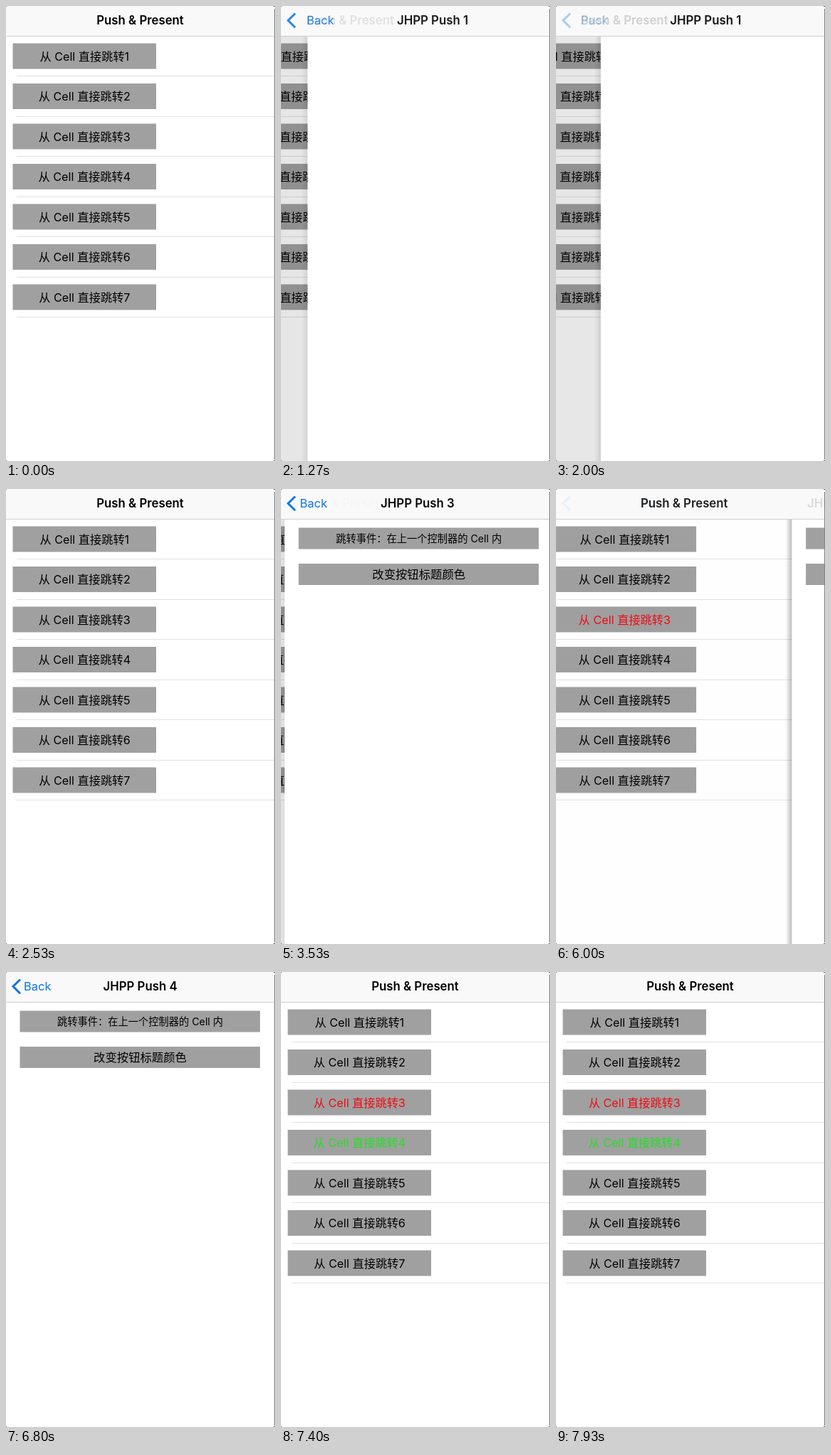
These frames come from a looping animation (378 by 640 pixels, 8 s). An HTML page with a canvas:

```html
<!DOCTYPE html>
<html lang="zh">
<head>
<meta charset="utf-8">
<title>Push &amp; Present</title>
<style>
html, body { margin: 0; width: 100%; height: 100%; overflow: hidden; background: #fff; }
canvas { display: block; width: 378px; height: 640px; }
</style>
</head>
<body>
<canvas id="stage"></canvas>
<script>
const W = 378, H = 640, BAR = 42, LOOP = 8000, TICK = 200 / 3;
const FONT = 'Inter, "Noto Sans CJK SC", "Noto Sans CJK", sans-serif';
const GREY = '#a0a0a0', BLUE = '#0b74e8';
const MID = 188.5;

// Each visit: push start, Back pressed, pop start, colour given to its cell
const visits = [
  { page: 1, push: 1053, press: 1925, pop: 1960, color: '#000' },
  { page: 3, push: 3190, press: 4925, pop: 5000, color: '#f00a14' },
  { page: 4, push: 5967, press: 6860, pop: 6900, color: '#22e022' }
];

const canvas = document.getElementById('stage');
const ctx = canvas.getContext('2d');
const dpr = window.devicePixelRatio || 1;
canvas.width = W * dpr;
canvas.height = H * dpr;

// Critically damped spring, 0 to 1
function spring(ms) {
  if (ms <= 0) return 0;
  if (ms >= 500) return 1;
  const x = ms * 0.01826;
  return 1 - (1 + x) * Math.exp(-x);
}

const smooth = p => p * p * (3 - 2 * p);

function rect(x, y, w, h, color) {
  ctx.fillStyle = color;
  ctx.fillRect(x, y, w, h);
}

function text(str, x, y, size, color, align = 'center', weight = 400) {
  ctx.font = `${weight} ${size}px ${FONT}`;
  ctx.textAlign = align;
  ctx.fillStyle = color;
  ctx.fillText(str, x, y);
}

function drawList(x, t) {
  ctx.save();
  ctx.translate(x, 0);
  for (let i = 0; i < 7; i++) {
    const y = 52.5 + i * 56.5;
    const visit = visits.find(v => v.page === i + 1);
    const color = visit && t >= visit.press ? visit.color : '#000';
    rect(9.5, y, 201.5, 36, GREY);
    text(`从 Cell 直接跳转${i + 1}`, 110.3, y + 24.2, 16.2, color);
    rect(15, Math.round(y + 45.5), W - 15, 1, '#e1e1e1');
  }
  ctx.restore();
}

function drawPage(x, page, p) {
  // The edge shadow fades out as the page settles on either side
  const alpha = 0.28 * Math.sqrt(1 - p) * Math.min(1, p * 20);
  const shadow = ctx.createLinearGradient(x - 9, 0, x, 0);
  shadow.addColorStop(0, 'rgba(0,0,0,0)');
  shadow.addColorStop(1, `rgba(0,0,0,${alpha})`);
  rect(x - 9, BAR, 9, H - BAR, shadow);
  rect(x, BAR, W, H - BAR, '#fff');
  if (page === 1) return;
  ctx.save();
  ctx.translate(x, 0);
  rect(19.5, 54.5, 337.5, 30, GREY);
  text('跳转事件：在上一个控制器的 Cell 内', MID, 74.8, 14.25, '#000');
  rect(19.5, 105, 337.5, 30, GREY);
  text('改变按钮标题颜色', MID, 126, 16.35, '#000');
  ctx.restore();
}

// p is the page's progress, q the slightly later progress of the titles
function drawBar(page, p, q, pressed) {
  rect(0, 0, W, BAR, '#f9f9f9');
  rect(0, BAR, W, 1, '#cfcfcf');

  ctx.globalAlpha = Math.pow(q, 1.3) * (pressed ? 0.38 : 1);
  ctx.strokeStyle = BLUE;
  ctx.lineWidth = 3;
  ctx.beginPath();
  ctx.moveTo(20, 10.5);
  ctx.lineTo(10, 20.3);
  ctx.lineTo(20, 30.2);
  ctx.stroke();
  text('Back', 25 + 110 * (1 - q), 26, 16.5, BLUE, 'left');

  ctx.globalAlpha = 1 - p;
  text('Push & Present', MID - 103 * Math.pow(q, 1.2), 26, 16.8, '#000', 'center', 600);
  ctx.globalAlpha = q;
  text(`JHPP Push ${page}`, MID + 247 * (1 - q), 26, 16.8, '#000', 'center', 600);
  ctx.globalAlpha = 1;
}

function drawEdge() {
  rect(W - 1, 4, 1, H - 6, '#808080');
  for (const y of [0, H - 1]) {
    rect(0, y, 1, 1, '#666');
    rect(W - 2, y, 2, 1, '#666');
  }
}

function draw(t) {
  const visit = visits.filter(v => t >= v.push).pop() || visits[0];
  const popping = t >= visit.pop;
  const p = popping ? 1 - spring(t - visit.pop) : spring(t - visit.push);
  const q = popping ? 1 - spring(t - visit.pop - 13) : p;
  const x = W * (1 - p);

  ctx.setTransform(dpr, 0, 0, dpr, 0, 0);
  rect(0, 0, W, H, '#fff');
  drawList(-0.3 * W * p, t);
  if (p > 0) {
    rect(0, BAR, x, H - BAR, `rgba(0,0,0,${0.1 * smooth(p)})`);
    drawPage(x, visit.page, p);
  }
  drawBar(visit.page, p, q, t >= visit.press);
  drawEdge();
}

const start = performance.now();
function loop() {
  const t = (performance.now() - start) % LOOP;
  draw(Math.floor((t + 5) / TICK) * TICK);
  requestAnimationFrame(loop);
}
loop();
</script>
</body>
</html>
```
